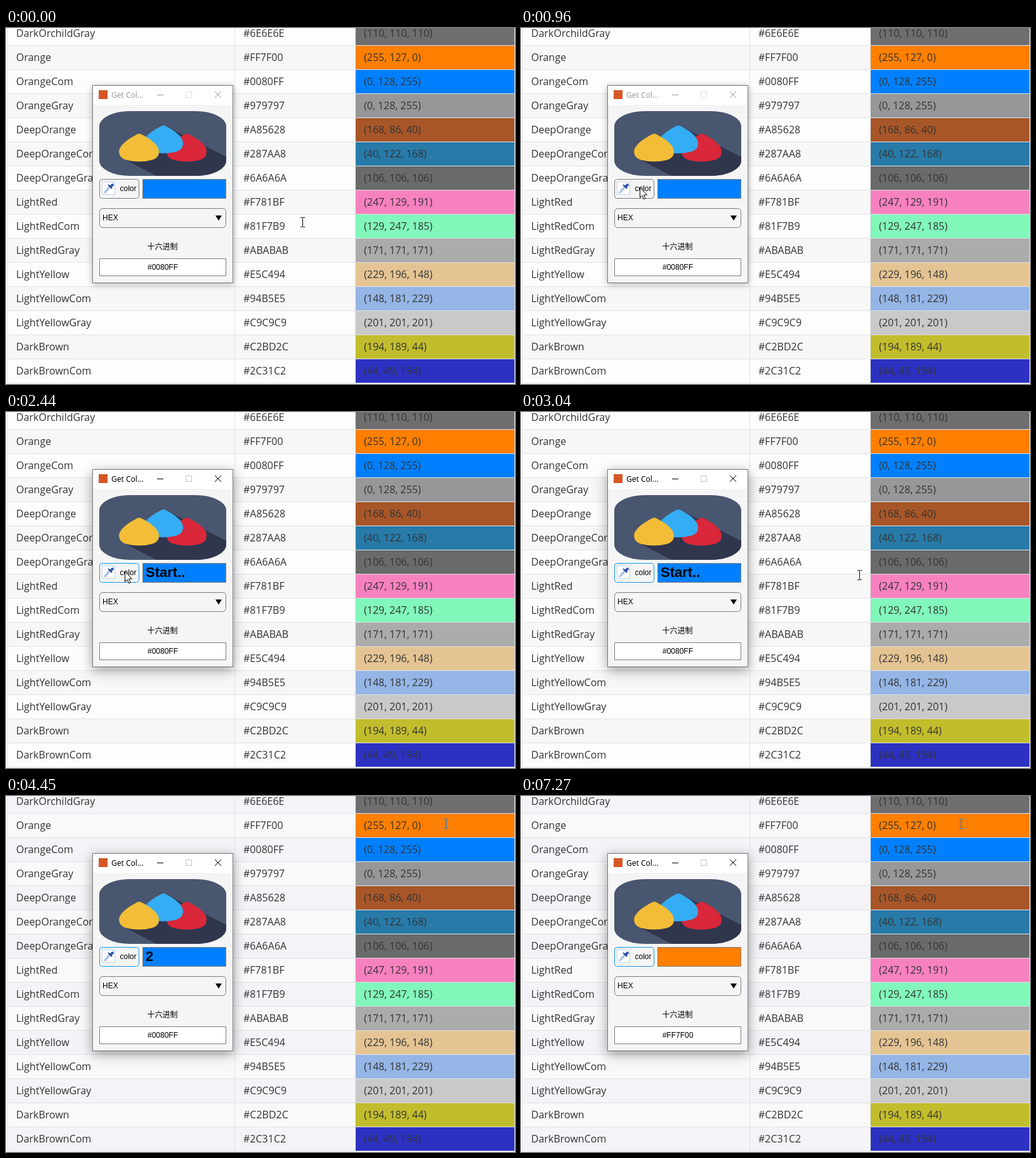
Recreate the animation shown at these times as an HTML page with a canvas. Size 802 by 561 pixels, loop 8 s.

```html
<!DOCTYPE html>
<html lang="en">
<head>
<meta charset="utf-8">
<title>Colour picker</title>
<style>
html, body { margin: 0; width: 100%; height: 100%; overflow: hidden; background: #fff; }
canvas { display: block; }
</style>
</head>
<body>
<canvas id="stage" width="802" height="561"></canvas>
<script>
const ctx = document.getElementById('stage').getContext('2d');
const LOOP = 8000;
const ROW = 38;
const PAGE = '16px "Open Sans", sans-serif';
const UI = '12px "Liberation Sans", Arial, sans-serif';

const rows = `DarkOrchildGray 6E6E6E
Orange FF7F00
OrangeCom 0080FF
OrangeGray 979797
DeepOrange A85628
DeepOrangeCom 287AA8
DeepOrangeGray 6A6A6A
LightRed F781BF
LightRedCom 81F7B9
LightRedGray ABABAB
LightYellow E5C494
LightYellowCom 94B5E5
LightYellowGray C9C9C9
DarkBrown C2BD2C
DarkBrownCom 2C31C2`.split('\n').map(line => {
  const [name, hex] = line.split(' ');
  const rgb = hex.match(/../g).map(v => parseInt(v, 16));
  // The table itself lists this row with the wrong triple.
  const label = name === 'OrangeGray' ? '0, 128, 255' : rgb.join(', ');
  return { name, hex: '#' + hex, label: `(${label})` };
});

// Pointer samples: time, x, y.
const pointer = [
  [0, 467, 306], [120, 455, 304], [240, 400, 298], [360, 330, 287],
  [480, 270, 275], [600, 220, 265], [720, 192, 259], [840, 185, 257],
  [960, 187, 251], [2810, 300, 262], [2930, 430, 260], [3040, 533, 257],
  [3160, 600, 230], [3280, 650, 170], [3400, 685, 100], [3520, 698, 60],
  [3640, 697, 52], [3760, 695, 47], [3860, 693, 44]
];
const countdown = [[0, ''], [2440, 'Start..'], [3520, '3'], [4450, '2'], [5440, '1'], [7270, '']];

const at = (track, t) => track.filter(k => k[0] <= t).pop();

function rect(x, y, w, h, fill) {
  ctx.fillStyle = fill;
  ctx.fillRect(x, y, w, h);
}

function text(s, x, y, font, fill = '#000', align = 'left') {
  ctx.font = font;
  ctx.fillStyle = fill;
  ctx.textAlign = align;
  ctx.fillText(s, x, y);
}

function box(x, y, w, h, r, fill, line) {
  ctx.beginPath();
  ctx.roundRect(x + .5, y + .5, w - 1, h - 1, r);
  ctx.fillStyle = fill;
  ctx.fill();
  ctx.strokeStyle = line;
  ctx.lineWidth = 1;
  ctx.stroke();
}

function poly(points, fill) {
  ctx.beginPath();
  points.forEach(([x, y]) => ctx.lineTo(x, y));
  ctx.closePath();
  ctx.fillStyle = fill;
  ctx.fill();
}

function stroke(d, color, width = 1) {
  ctx.strokeStyle = color;
  ctx.lineWidth = width;
  ctx.stroke(new Path2D(d));
}

function table(t) {
  const [even, odd] = t < 3160 ? ['#fdfdfd', '#f7f7f7'] : ['#f4f4f8', '#f9f9f9'];
  rect(0, 0, 802, 561, '#fff');
  rows.forEach((row, i) => {
    const y = i * ROW - 10;
    rect(3, y, 548, ROW - 1, i % 2 ? odd : even);
    rect(551, y, 250, ROW - 1, row.hex);
    rect(2, y + ROW - 1, 800, 1, '#dfe2e5');
    text(row.name, 16, y + 24, PAGE, '#333');
    text(row.hex, 374, y + 24, PAGE, '#333');
    text(row.label, 564, y + 24, PAGE, '#333');
  });
  for (const x of [2, 360, 550, 801]) rect(x, 0, 1, 561, '#dfe2e5');
}

const pileShape = new Path2D('M204 169Q210 164 216 169Q241 182 241 195Q241 205 230 208Q210 213 189 208Q178 204 178 195Q179 182 204 169Z');

function pile(dx, dy, fill) {
  ctx.save();
  ctx.translate(dx, dy);
  ctx.fillStyle = fill;
  ctx.fill(pileShape);
  ctx.restore();
}

function banner() {
  ctx.save();
  ctx.beginPath();
  ctx.roundRect(147, 131, 200, 102, { x: 48, y: 24 });
  ctx.clip();
  rect(147, 131, 200, 102, '#49566f');
  poly([[250, 154], [347, 203], [347, 233], [237, 233], [183, 205]], '#30364c');
  pile(75, 0, '#da2739');
  pile(38, -13, '#35adf4');
  pile(0, 0, '#f3bd37');
  ctx.restore();
}

function dropper(pressed) {
  ctx.save();
  if (pressed) ctx.globalAlpha = .7;
  rect(152, 242, 20, 21, pressed ? '#c4c8d0' : '#fff');
  ctx.setLineDash([2, 1]);
  stroke('M151.5 242.5H171.5V262.5H151.5Z', '#a9bfdc');
  ctx.setLineDash([]);
  stroke('M155 260L164 250', '#7fa6dc', 3);
  stroke('M155 260L163 251', '#e4efff', 1);
  stroke('M161 247L167 253', '#27408f', 2);
  stroke('M165 250L169 246', '#2f55b5', 4);
  ctx.restore();
}

function panel(t) {
  const active = t >= 2080;
  const pressed = active && t < 2440;
  const picked = t >= 7270;
  const ink = active ? '#000' : '#999';

  ctx.save();
  ctx.shadowColor = active ? 'rgba(0,0,0,.38)' : 'rgba(0,0,0,.3)';
  ctx.shadowBlur = active ? 18 : 10;
  ctx.shadowOffsetY = active ? 5 : 2;
  rect(136, 90, 222, 312, '#777');
  ctx.restore();
  rect(137, 91, 220, 310, '#f5f5f5');
  rect(137, 91, 220, 30, '#fff');

  rect(146, 98, 14, 14, '#d4572a');
  text('Get Col...', 166, 110, '12px "Noto Sans", sans-serif', ink);
  stroke('M238 105.5H248', ink);
  stroke('M283.5 100.5H292.5V109.5H283.5Z', active ? '#c4c4c4' : '#ddd');
  stroke('M329 100L339 110M339 100L329 110', ink);

  banner();

  box(147, 238, 63, 31, 4, pressed ? '#b7b7b7' : '#f5f5f5', active ? '#1597ea' : '#7d7d7d');
  dropper(pressed);
  text('color', 179.5, 257, UI);

  box(215, 238, 132, 31, 0, picked ? '#ff7f00' : '#0080ff', '#7d7d7d');
  text(at(countdown, t)[1], 220, 260, 'bold 22px "Liberation Sans", Arial, sans-serif');

  box(147, 284, 200, 31, 5, '#f5f5f5', '#7d7d7d');
  text('HEX', 152, 303, UI);
  poly([[330, 295.5], [340, 295.5], [335, 303.5]], '#000');

  text('十六进制', 246.5, 349, '12px "Noto Sans CJK SC", "Noto Sans CJK", sans-serif', '#000', 'center');
  box(147, 363, 200, 28, 0, '#fff', '#7d7d7d');
  text(picked ? '#FF7F00' : '#0080FF', 247, 381, UI, '#000', 'center');
}

function cursor(t) {
  const [, x, y] = at(pointer, t);
  ctx.save();
  ctx.translate(x, y);
  if (x < 358) {
    const arrow = 'M.5 .5V16.5L4 13L6.5 18.8L9 17.7L6.5 12H11.5Z';
    ctx.fillStyle = '#fff';
    ctx.fill(new Path2D(arrow));
    stroke(arrow, '#000');
  } else {
    // The text caret inverts whatever lies under it.
    ctx.globalCompositeOperation = 'difference';
    rect(0, -7, 1, 14, '#fff');
    for (const edge of [-8, 7]) {
      rect(-3, edge, 3, 1, '#fff');
      rect(1, edge, 3, 1, '#fff');
    }
  }
  ctx.restore();
}

function draw() {
  const t = performance.now() % LOOP;
  table(t);
  panel(t);
  cursor(t);
  requestAnimationFrame(draw);
}
draw();
</script>
</body>
</html>
```
